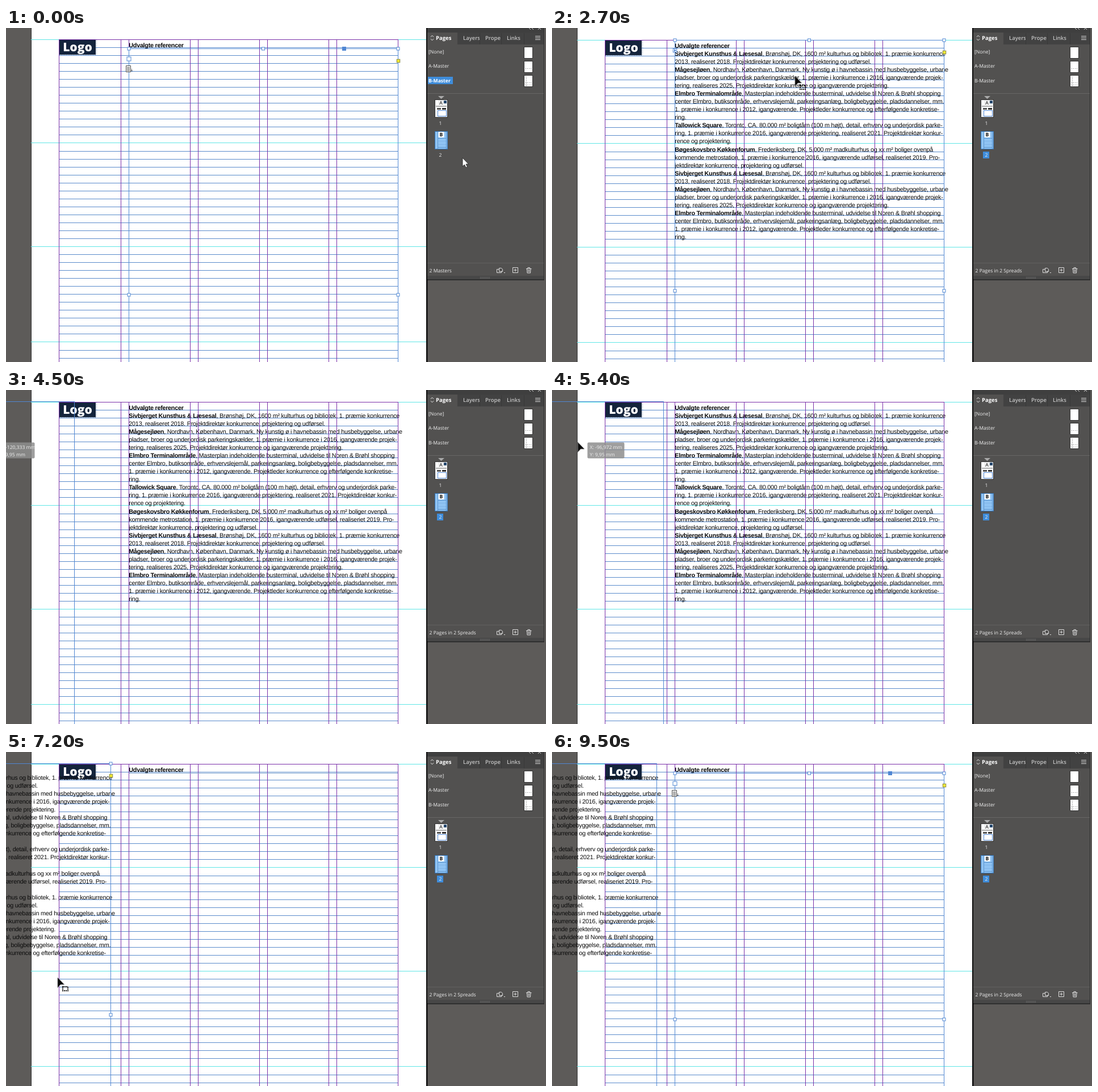
Write an HTML page that moves like this. It is 951x589 px and loops after 9800 ms.

```html
<!DOCTYPE html>
<html lang="da">
<head>
<meta charset="utf-8">
<style>
html, body { margin: 0; width: 100%; height: 100%; overflow: hidden; background: #5d5b59; }
svg { display: block; width: 951px; height: 589px; }
text { text-rendering: geometricPrecision; }
.body { font: 10.8px "Liberation Sans", Arial, sans-serif; letter-spacing: -.22px; fill: #0b0b0b; }
.b { font-weight: 700; letter-spacing: -.27px; }
.ui { font: 8.6px "Open Sans", "Noto Sans", sans-serif; fill: #f0f0f0; }
.tab { font-size: 9.5px; font-weight: 600; fill: #c4c4c4; }
.on { font-weight: 700; fill: #fff; }
.logo { font: 800 21px "Open Sans", "Noto Sans", sans-serif; fill: #fff; }
.ln { shape-rendering: crispEdges; fill: none; }
</style>
</head>
<body>
<svg viewBox="0 0 951 589" xmlns="http://www.w3.org/2000/svg">
  <g id="page"></g>
  <g id="drag"></g>
  <g id="panel"></g>
  <g id="top"></g>
</svg>
<script>
const LOOP = 9800;
const BLUE = '#5087d3', GRID = '#5a8bcb', PURPLE = '#7a2fa8', CYAN = '#5fe6e6';
const $ = id => document.getElementById(id);
const snap = v => Math.floor(v) + .5;
const line = (x1, y1, x2, y2, color) =>
  `<path class="ln" stroke="${color}" d="M${x1} ${y1}L${x2} ${y2}"/>`;
const rect = (x, y, w, h, fill, more = '') =>
  `<rect x="${x}" y="${y}" width="${w}" height="${h}" fill="${fill}" ${more}/>`;
const text = (x, y, s, cls, more = '') =>
  `<text x="${x}" y="${y}" class="${cls}" ${more}>${s}</text>`;
const box = (x, y, s, fill = '#fff', stroke = BLUE) =>
  rect(x - s / 2, y - s / 2, s, s, fill, `stroke="${stroke}"`);

// Each project: bold title, then its lines
const projects = [
  ['Sivbjerget Kunsthus &amp; Læsesal', ', Brønshøj, DK, 1600 m² kulturhus og bibliotek, 1. præmie konkurrence',
    '2013, realiseret 2018. Projektdirektør konkurrence, projektering og udførsel.'],
  ['Mågesejløen', ', Nordhavn, København, Danmark, Ny kunstig ø i havnebassin med husbebyggelse, urbane',
    'pladser, broer og underjordisk parkeringskælder, 1. præmie i konkurrence i 2016, igangværende projek-',
    'tering, realiseres 2025, Projektdirektør konkurrence og igangværende projektering.'],
  ['Elmbro Terminalområde', ', Masterplan indeholdende busterminal, udvidelse til Noren &amp; Brøhl shopping',
    'center Elmbro, butiksområde, erhvervslejemål, parkeringsanlæg, boligbebyggelse, pladsdannelser, mm.',
    '1. præmie i konkurrence i 2012, igangværende. Projektleder konkurrence og efterfølgende konkretise-',
    'ring.'],
  ['Tallowick Square', ', Toronto, CA. 80.000 m² boligtårn (100 m højt), detail, erhverv og underjordisk parke-',
    'ring, 1. præmie i konkurrence 2016, igangværende projektering, realiseret 2021. Projektdirektør konkur-',
    'rence og projektering.'],
  ['Bøgeskovsbro Køkkenforum', ', Frederiksberg, DK, 5.000 m² madkulturhus og xx m² boliger ovenpå',
    'kommende metrostation, 1. præmie i konkurrence 2016, igangværende udførsel, realiseriet 2019. Pro-',
    'jektdirektør konkurrence, projektering og udførsel.']
];
const STEP = 14.04, BASE = 35.5;

function story() {
  let row = 0, out = '';
  for (const i of [0, 1, 2, 3, 4, 0, 1, 2]) {
    const [title, first, ...rest] = projects[i];
    [`<tspan class="b">${title}</tspan>${first}`, ...rest].forEach(s => {
      out += text(216.3, BASE - .5 + STEP * ++row, s, 'body');
    });
  }
  return out;
}

function buildPage() {
  let grid = '', guides = '';
  for (let k = 0; k < 41; k++) {
    const y = snap(BASE + STEP * k);
    grid += [12, 25, 37].includes(k) ? line(44, y, 740, y, CYAN) : line(93, y, 691, y, GRID);
  }
  grid += line(44, 21.5, 740, 21.5, CYAN);
  for (const x of [93, 202, 216, 324, 338, 446, 460, 568, 582, 690])
    guides += line(x + .5, 21, x + .5, 592, PURPLE);
  guides += line(93, 21.5, 691, 21.5, PURPLE);
  $('page').innerHTML = rect(44, -2, 697, 600, '#fff') + line(44.5, -2, 44.5, 600, '#333') + grid +
    rect(94, 22, 64, 26, '#14243c') +
    `<path class="ln" stroke="#8fa6c4" stroke-dasharray="1 2" d="M159.5 22V47M94 48.5H159"/>` +
    text(126, 41.5, 'Logo', 'logo', 'text-anchor="middle"') +
    text(216.3, 35, 'Udvalgte referencer', 'body b') +
    `<g id="story">${story()}</g>` + guides + '<g id="sel"></g>';
}

function buildPanel() {
  let s = rect(740, 0, 211, 445, '#2f2f2f') + rect(740, 0, 2.5, 589, '#0c0c0c') +
    rect(742, 0, 205, 8, '#3f3f3f') + rect(742, 8, 205, 21, '#424242') +
    rect(742, 8, 53, 22, '#525150') + rect(742, 29, 205, 408, '#525150') +
    rect(742, 437, 205, 6, '#474747') + rect(948, 0, 3, 445, '#5d5b59') +
    `<path d="M924 -3l-3 3 3 3M929 -3l-3 3 3 3M937 -3l5 6M942 -3l-5 6" fill="none" stroke="#ccc"/>` +
    `<path d="M748 16l2.5-3 2.5 3M748 19l2.5 3 2.5-3" fill="none" stroke="#ddd"/>` +
    text(757, 21, 'Pages', 'ui tab on') + text(805, 21, 'Layers', 'ui tab') +
    text(844, 21, 'Prope', 'ui tab') + text(882, 21, 'Links', 'ui tab');
  for (const x of [834, 872, 912]) s += line(x + .5, 9, x + .5, 29, '#393939');
  for (const y of [14.5, 17.5, 20.5]) s += line(932, y, 941, y, '#ddd');
  s += text(744, 45, '[None]', 'ui') + text(744, 70.3, 'A-Master', 'ui');
  [33, 58, 83].forEach((y, i) => {
    s += rect(912.5, y + .5, 15, 20, '#fff', 'stroke="#333"');
    if (i) s += `<path class="ln" stroke="#777" stroke-dasharray="1 2" d="M915 ${y + 13.5}H926${i > 1 ? `M916.5 ${y + 3}V${y + 19}M915 ${y + 17.5}H926` : ''}"/>`;
  });
  s += line(742, 115.5, 947, 115.5, '#676665') + line(742, 414.5, 947, 414.5, '#626160') +
    `<path d="M761 120h11l-5.5 5z" fill="#aaa"/>` +
    // page 1
    rect(755.5, 126.5, 22, 31, '#fff', 'stroke="#333"') + rect(771, 128, 5, 5, '#27496f') +
    rect(757, 137, 19, 2, '#aaa') + rect(759, 141, 7, 3, '#555') + rect(768, 141, 7, 3, '#333') +
    rect(760.5, 145.5, 15, 10, '#fff', `stroke="${BLUE}"`) + rect(761, 127, 10, 9, '#eee') +
    text(766, 135, 'A', 'ui', 'style="fill:#111" text-anchor="middle"') +
    text(765, 171, '1', 'ui', 'text-anchor="middle"') +
    // page 2
    rect(755.5, 182.5, 22, 31, '#8fc3f3', 'stroke="#3573b4"') +
    `<path class="ln" stroke="#5b94cf" d="M760.5 183V213M775.5 183V213M761 194.5H776M761 210.5H776"/>` +
    `<path class="ln" stroke="#6fa6dd" stroke-dasharray="1 1" d="M762 199.5H775M762 205.5H775"/>` +
    rect(761.5, 183, 10, 10, '#fff') +
    text(766.5, 191, 'B', 'ui', 'style="fill:#111;font-weight:700" text-anchor="middle"') +
    '<g id="status"></g>' +
    // footer icons
    `<g fill="none" stroke="#ddd"><path d="M868 425.500h-3.500v6h8v-3M868.500 423.500h4l2 2v4h-6zM877 431.500h2"/>
     <path d="M892.500 422.500h9v9h-9zM897 424.500v5M894.500 427h5"/>
     <path d="M916 424.500h9.500M919 424v-1.500h3.500v1.500M917.500 425l.5 7h5.500l.5-7M919.800 426v4.500M921.800 426v4.500"/></g>` +
    `<path class="ln" stroke="#777" stroke-dasharray="1 1" d="M835 439.500H852M835 441.500H852"/>`;
  $('panel').innerHTML = s;
}

// Linear motion through [time, x, y] keys
function at(keys, t) {
  if (t <= keys[0][0]) return keys[0].slice(1);
  for (let i = 1; i < keys.length; i++) {
    const [t0, x0, y0] = keys[i - 1], [t1, x1, y1] = keys[i];
    if (t <= t1) {
      const k = (t - t0) / (t1 - t0);
      return [x0 + (x1 - x0) * k, y0 + (y1 - y0) * k];
    }
  }
  return keys[keys.length - 1].slice(1);
}
const mouse = [
  [200, 804, 229], [900, 765, 192], [1400, 765, 192], [1600, 846, 150], [1900, 600, 110],
  [2000, 600, 110], [2300, 358, 83], [2400, 358, 83], [2500, 424, 84], [2600, 424, 84],
  [2700, 428, 85], [2900, 537, 93], [6200, 33, 92], [7200, 91, 398], [7600, 112, 364],
  [7800, 112, 364], [8400, 385, 318], [8800, 398, 330], [9400, 116, 3], [9500, -60, -60]
];
const edge = [
  [2900, 690.5, 21.5], [3600, 262, 25.5], [3800, 221, 25.5], [4500, 120, 20.5], [4600, 118, 20.5],
  [4900, 201, 20.5], [5200, 201, 20.5], [6000, 184.77, 20.5]
];

const outline = (right, top) => {
  const left = right - 474;
  return `<path class="ln" stroke="${BLUE}" d="M${left} 600V${top}H${right}V600"/>`;
};

function handles(right, top, mid, master) {
  const left = right - 474, centre = right - 237.5;
  let s = outline(right, top);
  for (const x of [left, centre, right]) s += box(x, top, 5);
  s += box(left, mid, 5) + box(right, mid, 5) + box(right + .5, top + 21.5, 5.5, '#f2e935', '#8a8a3a');
  if (!master)
    return s + box(left, top + 18, 6.5) + `<path d="M${left - 1.5} ${top + 15.5}l4 2.5-4 2.5z" fill="${BLUE}"/>`;
  return s + box(right - 95, top, 6, BLUE) + box(left, top + 18, 7) +
    `<g fill="none" stroke="#555"><path fill="#eee" d="M211.500 67.500h8v11h-8z"/>
     <path d="M213 70.500h5M213 72.500h5M213 74.500h5M213 76.500h5M221.500 73v4M220 76.500h3" stroke-width=".8"/></g>`;
}

function cursor(x, y, kind) {
  const shape = kind === 'panel' ? 'M0 0V15L3.500 12 6 17 8.500 16 6 11H10.500Z'
    : kind === 'hollow' ? 'M0 0V13L4 9.500H10Z' : 'M0 0V17.500L5 12H11.500Z';
  const [fill, stroke] = kind === 'panel' ? ['#fff', '#222'] : kind === 'hollow' ? ['#fff', '#111'] : ['#0a0a0a', '#777'];
  const badge = kind === 'item'
    ? '<path class="ln" d="M8.500 15.500h9v7h-9z" stroke="#111" stroke-width="2" stroke-dasharray="2 1"/>' : '';
  return `<g transform="translate(${x.toFixed(1)} ${y.toFixed(1)})"><path d="${shape}" fill="${fill}" stroke="${stroke}" stroke-width=".8"/>${badge}</g>`;
}

function tip(x, y, right, top) {
  const mm = (v, n) => v.toFixed(n).replace('.', ',');
  return rect(x, y, 65, 28, '#8d8d8d', 'rx="2" opacity=".85"') +
    text(x + 4, y + 11.5, `X: ${mm(-89.667 + (right - 221) / 3.2935, 3)} mm`, 'ui') +
    text(x + 4, y + 24, `Y: ${mm(11.25 + (top - 25.5) / 3.85, 2)} mm`, 'ui');
}

function draw(time) {
  const t = Math.floor(time / 100) * 100;
  const onMaster = t < 1200, dragging = t >= 2900 && t < 6300, moved = t >= 6300;
  $('page').setAttribute('transform', `translate(0 ${onMaster ? -1 : 0})`);
  $('story').setAttribute('visibility', onMaster ? 'hidden' : 'visible');
  $('story').setAttribute('transform', `translate(${moved ? -506 : 0} 0)`);

  let sel = '';
  if (moved) {
    sel += line(217, 37.5, 690, 37.5, '#7ea3cf') +
      (t < 8300 ? handles(184.5, 20.5, 463.5) : outline(184.5, 20.5));
  }
  if (onMaster || t >= 8300) sel += handles(690.5, 37.5, 471.5, true);
  else if (t >= 2100 && t < 2900) sel += handles(690.5, 21.5, 463.5);
  else if (t >= 1700 && t < 2100) sel += outline(690.5, 21.5);
  $('sel').innerHTML = sel;

  let [x, y] = at(mouse, t), hint = '', ghost = '';
  let kind = x > 741 ? 'panel' : (t >= 2500 && t < 2900) || moved ? 'item' : 'arrow';
  if (dragging) {
    const [right, top] = at(edge, t), lift = top - 20.5;
    ghost = outline(snap(right), snap(top));
    x = right - 151.5 - lift * 1.5;
    y = top + 71.5;
    if (t >= 6000) kind = 'hollow';
    hint = tip(right - 134.5 - lift * 1.1, top + 72, right, top);
  }
  $('drag').innerHTML = ghost + hint;
  $('top').innerHTML = cursor(x, y, kind);

  $('status').innerHTML = (onMaster
    ? rect(743, 86, 44, 13, '#3f8ddb') + text(744, 95.5, 'B-Master', 'ui on')
    : text(744, 95.5, 'B-Master', 'ui') + rect(759, 218, 11, 12, '#3f8ddb')) +
    text(765, 227, '2', 'ui', 'text-anchor="middle"') +
    text(745.5, 430.5, onMaster ? '2 Masters' : '2 Pages in 2 Spreads', 'ui');
}

buildPage();
buildPanel();
const start = performance.now();
(function tick() {
  draw((performance.now() - start) % LOOP);
  requestAnimationFrame(tick);
})();
</script>
</body>
</html>
```
